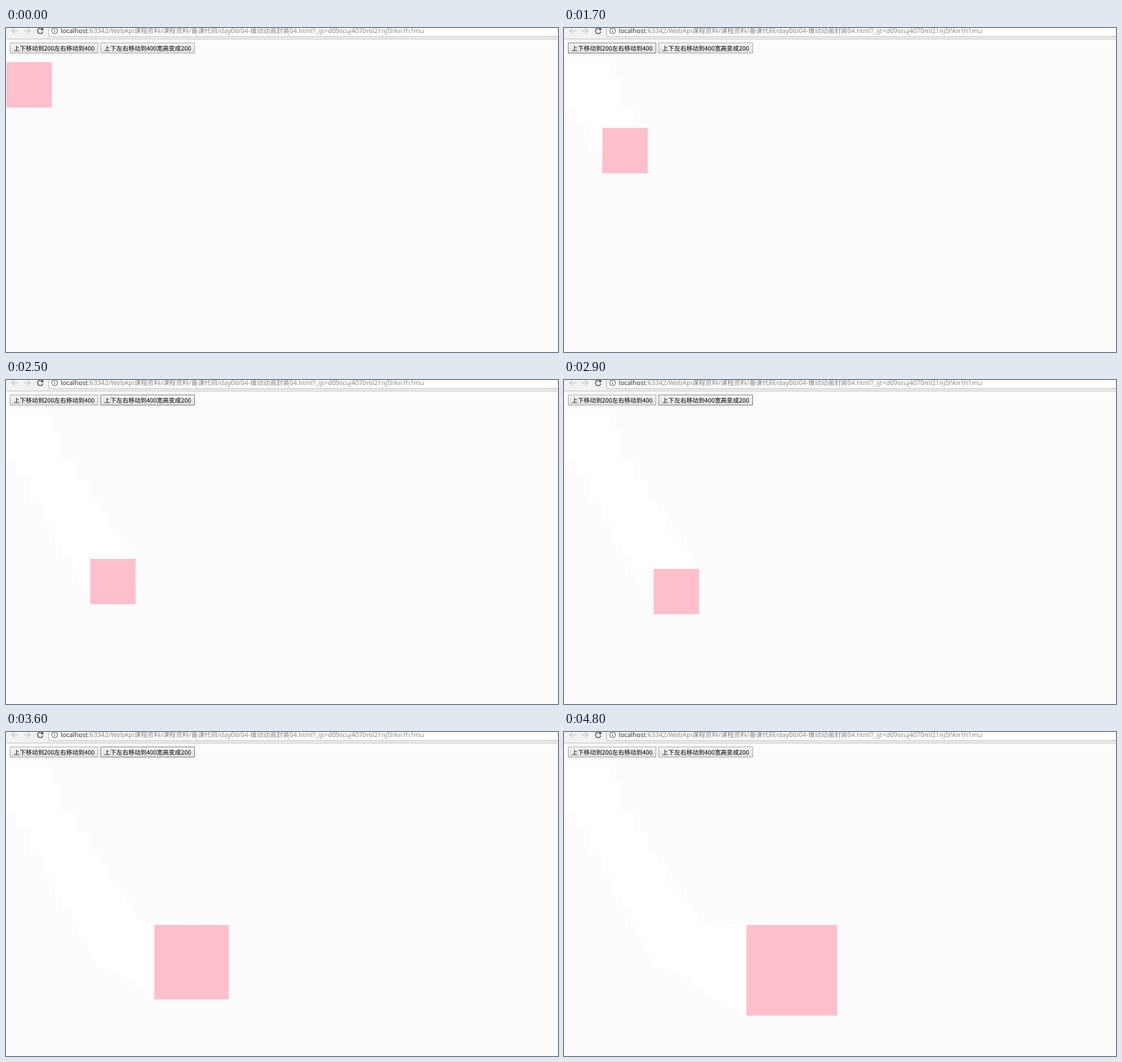
An HTML page with a canvas for the animation above (6100 ms loop, 976x574 px).

```html
<!DOCTYPE html>
<html lang="zh">
<head>
<meta charset="utf-8">
<style>
  html, body { margin: 0; width: 100%; height: 100%; overflow: hidden; background: #fcfcfc; }
  canvas { display: block; }
</style>
</head>
<body>
<canvas id="stage" width="976" height="574"></canvas>
<script>
const ctx = document.getElementById('stage').getContext('2d');
const LOOP = 6100, TICK = 100, SCALE = 0.8036;
const FIRST_MOVE = 1500, SECOND_TICK = 17, LAST_TICK = 33;
const CJK = '"Noto Sans CJK SC", "Noto Sans CJK", sans-serif';

// Each timer step covers a tenth of the remaining distance, rounded up.
function ease(value, target, steps) {
  while (steps-- > 0) value += Math.ceil((target - value) / 10);
  return value;
}

// About 2.17 timer steps run per screen update.
const stepsAt = tick => Math.floor(1.2 + 2.17 * tick);

function boxAt(tick) {
  const first = tick < 0 ? 0 : stepsAt(Math.min(tick, SECOND_TICK - 1));
  const second = tick < SECOND_TICK ? 0 : stepsAt(tick - SECOND_TICK);
  return {
    left: ease(ease(0, 200, first), 400, second),
    top: ease(ease(50, 400, first), 400, second),
    size: ease(100, 200, second)
  };
}

function drawBox({ left, top, size }, color) {
  ctx.fillStyle = color;
  ctx.fillRect(0.9 + left * SCALE, 20.3 + top * SCALE, size * SCALE, size * SCALE);
}

function line(color, width, path) {
  ctx.strokeStyle = color;
  ctx.lineWidth = width;
  ctx.stroke(new Path2D(path));
}

function text(string, x, y, font, color) {
  ctx.font = font;
  ctx.fillStyle = color;
  ctx.fillText(string, x, y);
  return x + ctx.measureText(string).width;
}

function drawToolbar() {
  ctx.fillStyle = '#f2f2f2';
  ctx.fillRect(0, 0, 976, 19);
  ctx.fillStyle = '#b8b8b8';
  ctx.fillRect(0, 19, 976, 1);

  ctx.fillStyle = '#fff';
  ctx.fillRect(75, 0, 901, 15);
  line('#b0b0b0', 1, 'M75.5 0V13.5Q75.5 15.5 77.5 15.5H976');

  line('#c6c6c6', 1.4, 'M20.5 5H10M15 0L10 5L15 10M32 5H42.5M37.5 0L42.5 5L37.5 10');
  line('#555', 1.6, 'M64.3 2.2A4.8 4.8 0 1 0 65.2 6.2');
  ctx.fillStyle = '#555';
  ctx.fill(new Path2D('M66 -1V4H61Z'));
  line('#555', 1.1, 'M91 5A5 5 0 1 1 81 5A5 5 0 1 1 91 5M86 4.3V8M86 2V3.2');

  const font = '11.57px "Open Sans", ' + CJK;
  const x = text('localhost', 96.5, 9, font, '#222');
  text(':63342/WebApi课程资料/课程资料/备课代码/day06/04-缓动动画封装04.html?_ijt=d09scuj4070ml21nj5hkn1h1mu',
    x, 9, font, '#858585');
}

function drawButton(label, x, width, hover, pressed) {
  const shade = ctx.createLinearGradient(0, 26, 0, 45);
  shade.addColorStop(0, pressed ? '#ddd' : '#f8f8f8');
  shade.addColorStop(1, pressed ? '#f8f8f8' : '#ddd');
  ctx.fillStyle = shade;
  ctx.fillRect(x, 26, width, 19);
  ctx.strokeStyle = hover ? '#787878' : '#a6a6a6';
  ctx.lineWidth = 1;
  ctx.strokeRect(x + 0.5, 26.5, width - 1, 18);
  text(label, x + 6.5, 40, '10.72px ' + CJK, '#000');
}

function draw(now) {
  const t = now % LOOP;
  const during = (from, to) => t >= from && t < to;
  const tick = Math.min(LAST_TICK, Math.floor((t - FIRST_MOVE) / TICK));

  ctx.textRendering = 'geometricPrecision';
  ctx.fillStyle = '#fcfcfc';
  ctx.fillRect(0, 0, 976, 574);
  drawToolbar();
  drawButton('上下移动到200左右移动到400', 7, 156, during(1200, 1900), during(1400, 1500));
  drawButton('上下左右移动到400宽高变成200', 167, 167, during(1900, 4500), during(3100, 3200));

  for (let past = -1; past < tick; past++) drawBox(boxAt(past), '#fff');
  drawBox(boxAt(tick), '#ffc0cb');
}

const start = performance.now();
function frame() {
  draw(performance.now() - start);
  requestAnimationFrame(frame);
}
frame();
</script>
</body>
</html>
```
